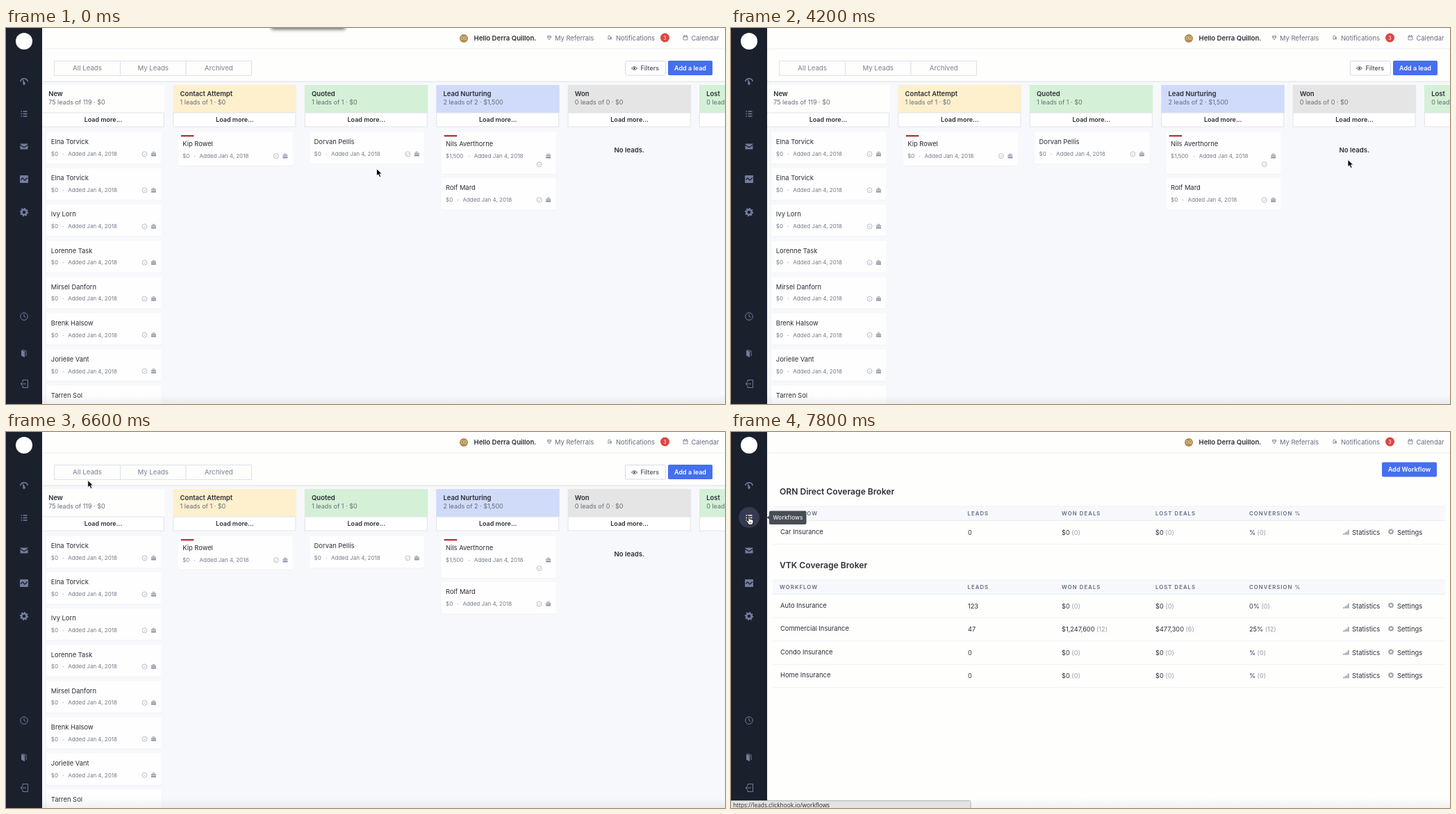
These frames come from a looping animation (1035x541 px, 8 s). An HTML page:

```html
<!DOCTYPE html>
<html lang="en">
<head>
<meta charset="utf-8">
<title>Leads board</title>
<style>
  html, body { margin: 0; width: 100%; height: 100%; overflow: hidden; background: #fefefd; }
  svg { display: block; font-family: Inter, sans-serif; }
  .line { fill: none; stroke: currentColor; stroke-width: 1; }
</style>
</head>
<body>
<svg id="stage" width="1035" height="541" viewBox="0 0 1035 541"></svg>
<script>
const DARK = '#2b2e36', SOFT = '#737988', MUTED = '#8b909d', RULE = '#e3e6eb', PAPER = '#fefefd';
const LOOP = 8000, STEP = 200, PAGE_SWITCH = 7600;
const SITE = 'https://leads.clickhook.io/';

// y is the middle of the capital letters
const text = (x, y, string, { size = 9.4, weight = 400, fill = DARK, anchor = 'start', extra = '' } = {}) =>
  `<text x="${x}" y="${y + size * 0.36}" font-size="${size}" font-weight="${weight}" fill="${fill}" text-anchor="${anchor}" ${extra}>${string}</text>`;
const rect = (x, y, w, h, fill, extra = '') =>
  `<rect x="${x}" y="${y}" width="${w}" height="${h}" fill="${fill}" ${extra}/>`;
const circle = (x, y, r, fill, extra = '') => `<circle cx="${x}" cy="${y}" r="${r}" fill="${fill}" ${extra}/>`;
const path = (d, extra = 'class="line"') => `<path d="${d}" ${extra}/>`;
const solid = 'fill="currentColor"';
const icon = (x, y, color, body, id = '') => `<g ${id && `id="${id}"`} transform="translate(${x} ${y})" color="${color}">${body}</g>`;
const rule = (x, y, w, color = RULE) => rect(x, y, w, 1, color);

const gear = r =>
  circle(0, 0, r * 0.62, 'none', `stroke="currentColor" stroke-width="${r * 0.45}"`) +
  circle(0, 0, r * 0.88, 'none', `stroke="currentColor" stroke-width="${r * 0.3}" pathLength="16" stroke-dasharray="1 1"`);
const check = circle(0, 0, 3.5, 'none', 'class="line" stroke-width=".7"') + path('M-1.6 0l1.2 1.2 2-2.2');
const briefcase = path('M-3.5-1.7h7v1.8h-7zM-3.5.7h7v2.5h-7z', solid) + path('M-1.4-2v-1h2.8v1');

function sidebar() {
  const c = '#727d9c';
  return rect(0, 0, 52, 541, '#1b202d') +
    circle(26, 19, 12, '#fff') +
    circle(26, 123, 15, '#343b50', 'id="navHover"') +
    icon(26, 76, c, path('M-5.2 1A5.3 5.3 0 0 1 5.2 1', 'class="line" style="stroke-width:1.6"') + path('M-2-3L2 4 0 6.500-1.500 5z', solid)) +
    icon(26, 123.5, c, path('M-4.500-3.500h1.500M-1.500-3.500h6M-4.500 0h1.500M-1.500 0h6M-4.500 3.500h1.500M-1.500 3.500h6', 'class="line" style="stroke-width:1.3"'), 'listIcon') +
    icon(26, 170.5, c, path('M-5.5-4h11v1L0 .6-5.500-3zM-5.500-1.600L0 2l5.500-3.600V4h-11z', solid)) +
    icon(26, 217.5, c, rect(-6, -5.5, 12, 11, 'currentColor', 'rx="1"') + path('M-5 1l3-2.500 3 3 4-3.500', 'fill="none" stroke="#1b202d" stroke-width="1.3"')) +
    icon(26, 265, c, gear(6)) +
    icon(26, 415, c, circle(0, 0, 5.3, 'none', 'class="line"') + path('M0-3.500V0l2.500 1.500')) +
    icon(26, 468, c, path('M-4-4.500L1-2.500V6L-4 3.500z', solid) + path('M-2.500-5L3-3.200V4')) +
    icon(26, 512, c, path('M-2-2.500V-5.500H5.500V5.500H-2V2.500M3 0H-5M-2.500-2.500L-5 0l2.500 2.500'));
}

function topBar() {
  const nav = { fill: '#666d80' };
  return rect(52, 0, 983, 30, PAPER) + rule(52, 29.5, 983, '#eceef1') +
    circle(659, 15, 6, '#b28c52') + text(659, 15.2, 'DQ', { size: 5.5, fill: '#f4e6cc', anchor: 'middle' }) +
    text(673.5, 14.5, 'Hello Derra Quillon.', { weight: 600, size: 9.6 }) +
    icon(782, 14, MUTED, path('M-2.500-2.500h5v2L0 3-2.500-.5zM-2.500-.7h5')) + text(790, 14.5, 'My Referrals', nav) +
    icon(869, 14, MUTED, path('M-2 2V-1a1.500 1.500 0 0 1 3-1M-2.500 2H3') + circle(1.5, 0, 1.5, 'currentColor')) +
    text(878, 14.5, 'Notifications', nav) +
    circle(948.5, 14, 6.5, '#df4541') + text(948.5, 14, '3', { size: 7, fill: '#fff', anchor: 'middle' }) +
    icon(978, 14, MUTED, path('M-3-2.500h6v5.500h-6zM-3-1h6M-1.500-4v1.500M1.500-4v1.500')) + text(986.5, 14.5, 'Calendar', nav);
}

const button = (x, y, w, label) => rect(x, y, w, 21, '#456fee', 'rx="2"') +
  text(x + w / 2, y + 10.7, label, { size: 9, weight: 600, fill: '#fff', anchor: 'middle' });

const TABS = [['All Leads', 69.5, 95], ['My Leads', 164.5, 94.5], ['Archived', 259, 94.5]];

function toolbar() {
  return rect(52, 30, 983, 47, PAPER) + rule(52, 76.5, 983, '#dfe2e8') +
    TABS.map(([label, x, w], i) =>
      rect(x, 47.5, w, 21, PAPER, `id="tab${i}" stroke="#dde1e7"`) +
      text(x + w / 2, 58, label, { size: 9.6, weight: 500, fill: MUTED, anchor: 'middle', extra: `id="tabLabel${i}"` })).join('') +
    rect(891.5, 47.5, 58, 20.5, '#fff', 'rx="2" stroke="#d5d9e0"') +
    icon(904.5, 58, '#444a57', path('M-4 0Q0-4.500 4 0Q0 4.500-4 0z') + circle(0, 0, 1.3, 'currentColor')) +
    text(913.5, 58, 'Filters', { size: 9, weight: 500, fill: '#4b505c' }) +
    button(953, 47, 64, 'Add a lead');
}

const COLUMNS = [
  ['New', '75 leads of 119 · $0', '#fefefd'],
  ['Contact Attempt', '1 leads of 1 · $0', '#fef0cd'],
  ['Quoted', '1 leads of 1 · $0', '#d4f0d6'],
  ['Lead Nurturing', '2 leads of 2 · $1,500', '#d0daf9'],
  ['Won', '0 leads of 0 · $0', '#e5e5e5'],
  ['Lost', '0 leads of 0 · $0', '#d4f0d6'],
];
const columnX = i => 51 + i * 189.4;
const NEW_LEADS = ['Elna Torvick', 'Elna Torvick', 'Ivy Lorn', 'Lorenne Task', 'Mirsel Danforn', 'Brenk Halsow', 'Jorielle Vant', 'Tarren Sol'];

function card(column, y, name, { amount = '$0', flagged = false, height = 45.5 } = {}) {
  const x = columnX(column), meta = { size: 8, fill: SOFT };
  const nameY = y + (flagged ? 16.8 : 14), metaY = nameY + 17.4, wide = amount.length > 2;
  const addedX = x + (wide ? 54.5 : 38.2);
  return rect(x + 7.5, y + 0.7, 165, height, '#eceef3', 'rx="2"') + rect(x + 7.5, y, 165, height, '#fefefe', 'rx="2"') +
    (flagged ? rect(x + 11.5, 154, 18.5, 2.4, '#b8363e') : '') +
    text(x + 13.8, nameY, name, { size: 9.4 }) +
    text(x + 13.8, metaY, amount, meta) + text(addedX - 8, metaY, '·', meta) + text(addedX, metaY, 'Added Jan 4, 2018', meta) +
    icon(x + 148.5, metaY + (wide ? 12 : 0), '#b9bdc8', check) + icon(x + 161.5, metaY, '#969dad', briefcase);
}

function board() {
  const columns = COLUMNS.map(([title, count, color], i) => {
    const x = columnX(i);
    return rect(x, 82, 177.5, 40, color) +
      text(x + 10.2, 95, title, { size: 9.5, weight: 600 }) +
      text(x + 10.2, 107, count, { size: 9, fill: '#666c79' }) +
      rect(x + 0.5, 122, 176, 20, '#fff', 'stroke="#e1e4ea"') +
      text(x + 89, 132, i < 5 ? 'Load more...' : '', { size: 9, weight: 600, anchor: 'middle' });
  }).join('');
  return rect(52, 77, 983, 464, '#f7f8fb') + columns +
    NEW_LEADS.map((name, i) => card(0, 150 + i * 52.05, name)).join('') +
    card(1, 150, 'Kip Rowel', { flagged: true, height: 48 }) +
    card(2, 150, 'Dorvan Pellis') +
    card(3, 150, 'Nils Averthorne', { amount: '$1,500', flagged: true, height: 60 }) +
    card(3, 216, 'Rolf Mard') +
    text(897.3, 175.5, 'No leads.', { size: 9.6, weight: 600, anchor: 'middle' }) +
    toolbar();
}

function workflowRow(y, [name, leads, won, lost, conversion]) {
  const counted = (x, [value, n]) =>
    text(x, y + 1, `${value} <tspan fill="#969dad">(${n})</tspan>`, { size: 9.2 });
  return text(71, y, name, { size: 9.35 }) + text(341, y + 1, leads, { size: 9.2 }) +
    counted(476, won) + counted(611, lost) + counted(746, conversion) +
    icon(885.5, y + 1, '#9aa0ae', path('M-4.500 3.500V2h2v1.500zM-2 3.500V.5h1.700v3zM.2 3.500v-4.500h1.700v4.500zM2.400 3.500v-7h1.700v7z', solid)) +
    text(894, y + 1, 'Statistics') + icon(950, y, '#9aa0ae', gear(4)) + text(959, y + 1, 'Settings') +
    rule(60, y + 17.5, 968, '#f0f2f5');
}

function workflowTable(y, title, rows) {
  const heads = [['WORKFLOW', 70], ['LEADS', 340.5], ['WON DEALS', 476], ['LOST DEALS', 611], ['CONVERSION %', 746]];
  return text(70, y, title, { size: 12.1, weight: 600 }) +
    rect(60, y + 21, 968, 20.5, '#f6f8fb') + rule(60, y + 20.5, 968, '#eff1f5') + rule(60, y + 41, 968, '#eaedf2') +
    heads.map(([label, x]) => text(x, y + 31.5, label, { size: 7.7, weight: 600, fill: '#626b7e', extra: 'letter-spacing="1.1"' })).join('') +
    rows.map((row, i) => workflowRow(y + 57.3 + i * 33.5, row)).join('');
}

function workflows() {
  const none = ['$0', 0], blank = ['%', 0];
  return rect(52, 30, 983, 511, PAPER) + button(937, 43.5, 79, 'Add Workflow') +
    workflowTable(86, 'ORN Direct Coverage Broker', [['Car Insurance', 0, none, none, blank]]) +
    workflowTable(192, 'VTK Coverage Broker', [
      ['Auto Insurance', 123, none, none, ['0%', 0]],
      ['Commercial Insurance', 47, ['$1,247,600', 12], ['$477,300', 6], ['25%', 12]],
      ['Condo Insurance', 0, none, none, blank],
      ['Home Insurance', 0, none, none, blank],
    ]);
}

const stage = document.getElementById('stage');
stage.innerHTML = `
  <defs>
    <filter id="blur" x="-20%" y="-200%" width="140%" height="500%"><feGaussianBlur stdDeviation="2.5"/></filter>
    <linearGradient id="foot" x2="0" y2="1"><stop stop-color="#888" stop-opacity="0"/><stop offset="1" stop-color="#888" stop-opacity=".12"/></linearGradient>
  </defs>
  <g id="boardPage">${board()}</g><g id="workflowPage">${workflows()}</g>
  ${rect(52, 527, 983, 14, 'url(#foot)')}${topBar()}${sidebar()}
  <g id="tooltip">${path('M51.500 123l4-3v6z', 'fill="#474d54"')}${rect(55, 113.5, 53.5, 19.5, '#474d54', 'rx="2"')}
    ${text(82, 123.3, 'Workflows', { size: 8.1, weight: 500, fill: '#f2f3f4', anchor: 'middle', extra: 'letter-spacing=".2"' })}</g>
  <g id="status">${rect(-0.5, 530.5, 345.5, 12, '#e3e3e3', 'rx="1.5" stroke="#b4b4b4"')}
    <text id="address" x="3" y="539.6" font-size="8.33" font-family="Open Sans, sans-serif" fill="#2c2c2c"></text></g>
  <g id="shade">${rect(382, -6, 106, 8, '#333', 'filter="url(#blur)" opacity=".75"')}</g>
  <g id="arrow">${path('M0 0V10.300L2.400 8.100 4.200 12 6.100 11.200 4.400 7.400H7.600z', 'fill="#000" stroke="#fff" stroke-width=".8"')}</g>
  <g id="hand">${path('M-1 1Q0-.6 1 1V4.500Q2 3.500 2.800 4.700 3.800 4 4.500 5.200 5.900 4.600 6 6.500V8.500Q5.800 10 5 11V12.500H-1V11.200L-3.800 7.500Q-4 6-2.500 6.300L-1 7.500z', 'fill="#fff" stroke="#000" stroke-width=".9"')}
    ${path('M1.200 8.500v2M2.900 8.500v2', 'stroke="#000" stroke-width=".6"')}</g>`;

const $ = id => document.getElementById(id);
const show = (id, visible) => $(id).setAttribute('visibility', visible ? 'visible' : 'hidden');

// Cursor stops: time, x, y
const STOPS = [
  [0, 533.5, 202.5], [200, 533.5, 202.5], [1200, 209.5, 104.5], [1400, 209.5, 104.5], [2200, 668, 106.5],
  [2800, 862, 112], [3800, 888, 189.5], [4400, 888, 189.5], [5500, 300, 60], [6000, 150, 51.5],
  [6400, 150, 51.5], [7000, 26, 121], [LOOP, 26, 121],
];

function cursorAt(t) {
  const i = STOPS.findIndex(stop => stop[0] > t);
  const [t0, x0, y0] = STOPS[i - 1], [t1, x1, y1] = STOPS[i];
  const p = (t - t0) / (t1 - t0), eased = p * p * (3 - 2 * p);
  return [x0 + (x1 - x0) * eased, y0 + (y1 - y0) * eased];
}

function render(t) {
  const [x, y] = cursorAt(t);
  const hoveredTab = TABS.findIndex(([, left, w]) => x >= left && x < left + w && y > 47 && y < 69);
  const overNav = Math.hypot(x - 26, y - 123) < 15;
  const pointing = overNav || hoveredTab >= 0;

  TABS.forEach((_, i) => {
    const on = i === hoveredTab;
    $('tab' + i).setAttribute('fill', on ? '#f7f8fb' : PAPER);
    $('tabLabel' + i).setAttribute('font-weight', on ? 600 : 500);
    $('tabLabel' + i).setAttribute('fill', on ? DARK : MUTED);
  });
  show('boardPage', t < PAGE_SWITCH);
  show('workflowPage', t >= PAGE_SWITCH);
  show('navHover', overNav);
  show('tooltip', overNav);
  $('listIcon').setAttribute('color', overNav ? '#fff' : '#727d9c');
  show('status', pointing);
  $('address').textContent = SITE + (overNav ? 'workflows' : '?workflowId=918');
  show('shade', t < STEP);
  show('arrow', !pointing);
  show('hand', pointing);
  $(pointing ? 'hand' : 'arrow').setAttribute('transform', `translate(${x} ${y})`);
}

function tick() {
  render(Math.floor(performance.now() % LOOP / STEP) * STEP);
  requestAnimationFrame(tick);
}
tick();
</script>
</body>
</html>
```
